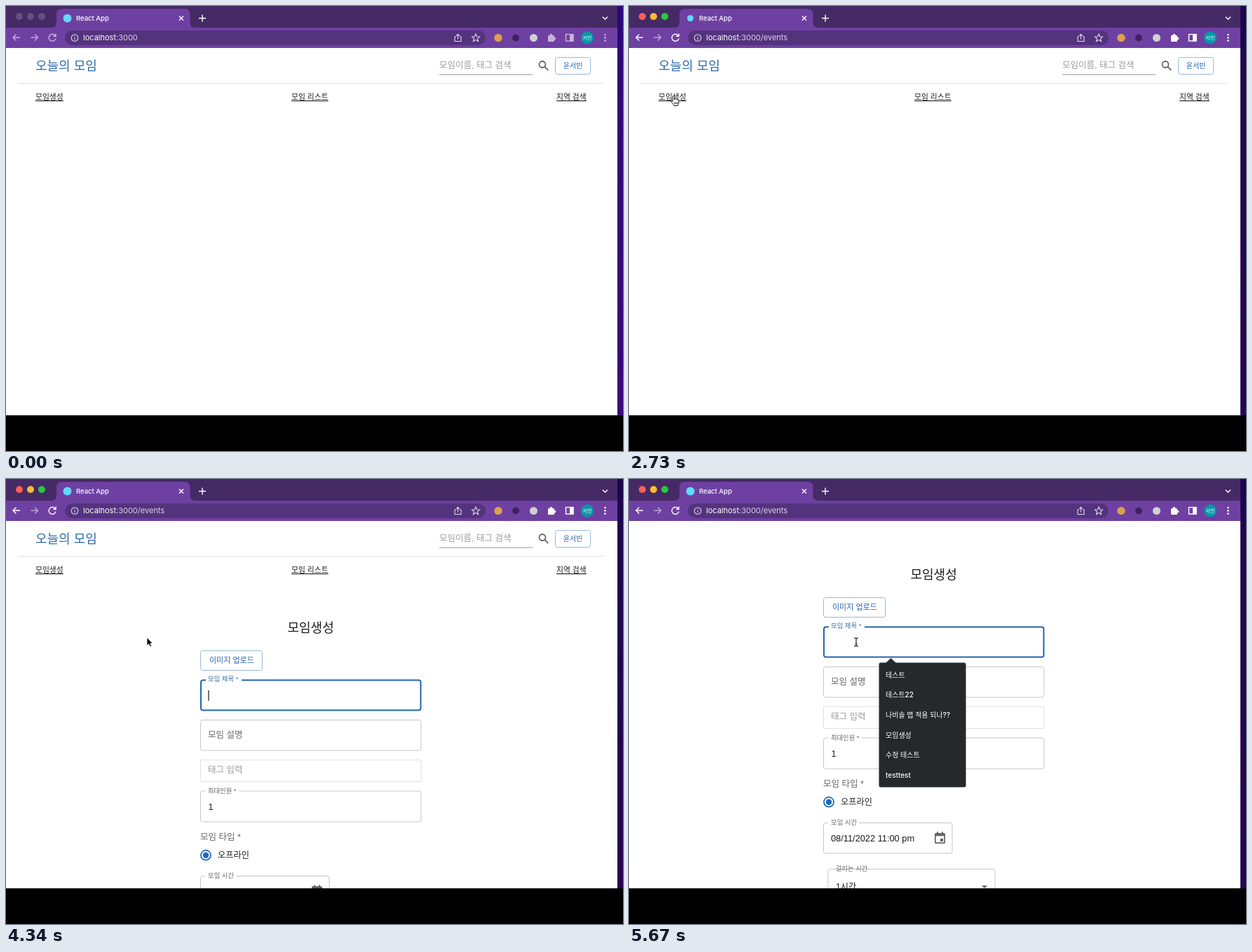
Animation of 880x636 px, one loop 5950 ms. Source, as an HTML page:

```html
<!DOCTYPE html>
<html lang="ko">
<head>
<meta charset="utf-8">
<title>오늘의 모임</title>
<style>
  html, body { margin: 0; width: 100%; height: 100%; overflow: hidden; background: #000; }
  svg { display: block; }
  text { font-family: "Liberation Sans", "Noto Sans CJK KR", sans-serif; font-size: 12.5px; fill: #1a1a1a; white-space: pre; }
  .ui text { font-family: Inter, "Noto Sans CJK KR", sans-serif; fill: #fff; }
  .title { font-size: 18px; }
  .nav { font-size: 10.8px; text-decoration: underline; }
  .button { font-weight: 500; fill: #2565ae; }
  .grey { fill: #666; }
  .hint { fill: #9c9c9c; }
  .small { font-size: 9.3px; }
  .box { fill: none; stroke: #c6c6c6; }
  .blue { fill: none; stroke: #97b8d8; }
  .icon { fill: none; stroke: #fff; stroke-width: 1.4; }
  .pale { stroke: #e2d8ee; stroke-width: 1.1; }
  .solid { fill: #fff; stroke: none; }
  #popup text { font-size: 10px; font-weight: 500; }
</style>
</head>
<body>
<svg width="880" height="636" viewBox="0 0 880 636">
  <defs>
    <linearGradient id="desk" x2="0" y2="1">
      <stop stop-color="#2c0878"/><stop offset="1" stop-color="#3d067c"/>
    </linearGradient>
    <clipPath id="view"><rect y="60" width="872" height="525"/></clipPath>
  </defs>
  <rect width="880" height="636"/>
  <rect x="871" width="9" height="585" fill="url(#desk)"/>
  <rect id="shade" x="871" width="9" height="585" opacity=".35"/>
  <rect y="60" width="872" height="525" fill="#fff"/>

  <g clip-path="url(#view)">
    <g id="page">
      <text class="title" x="42" y="91.5" style="fill:#2c69b0">오늘의 모임</text>
      <text class="hint" x="618" y="89.3">모임이름, 태그 검색</text>
      <path d="M618 98H751" stroke="#949494"/>
      <g fill="none" stroke="#665f66" stroke-width="1.8">
        <circle cx="765" cy="83.5" r="4.5"/><path d="M768.3 86.8L773.3 91.8"/>
      </g>
      <rect class="blue" x="783.5" y="73.5" width="50" height="24" rx="3"/>
      <text class="button" x="808.5" y="88.8" font-size="10" text-anchor="middle" style="font-size:10px">윤서빈</text>
      <path d="M17 110.5H853" stroke="#e0e0e0"/>
      <text class="nav" x="42" y="134">모임생성</text>
      <text class="nav" x="407" y="134">모임 리스트</text>
      <text class="nav" x="785" y="134">지역 검색</text>

      <g id="form">
        <text class="title" x="401.5" y="219">모임생성</text>
        <rect class="blue" x="277.5" y="245.5" width="88" height="28" rx="3"/>
        <text class="button" x="290" y="263" style="font-size:11px">이미지 업로드</text>

        <rect x="278" y="287.5" width="313.5" height="43" rx="3" fill="none" stroke="#2565ae" stroke-width="2"/>
        <rect class="notch" x="285" y="285" width="51" height="5" fill="#fff"/>
        <text id="nameLabel" x="288" style="fill:#3a6ea8">모임 제목 *</text>
        <rect id="caret" x="288.4" y="302" width="1.1" height="15"/>

        <rect class="box" x="277.5" y="344.5" width="314.5" height="43.5" rx="3"/>
        <text class="grey" x="288" y="370">모임 설명</text>

        <rect class="box" x="277.5" y="401.5" width="314.5" height="31" rx="1" style="stroke:#e0e0e0"/>
        <text id="tagHint" class="hint" x="288" y="420.3">태그 입력</text>

        <rect class="box" x="277.5" y="446" width="314.5" height="44" rx="3"/>
        <rect x="284" y="444" width="48" height="4" fill="#fff"/>
        <text class="grey small" x="288" y="448.5">최대인원 *</text>
        <text x="288.5" y="472.5">1</text>

        <text class="grey" x="277" y="516">모임 타입 *</text>
        <circle cx="285" cy="537.7" r="7" fill="none" stroke="#1b6ac0" stroke-width="1.7"/>
        <circle cx="285" cy="537.7" r="4.2" fill="#1b6ac0"/>
        <text x="302" y="542" style="font-size:12.2px">오프라인</text>

        <rect class="box" x="277.5" y="567.5" width="183.5" height="43.5" rx="3"/>
        <rect class="notch" x="284" y="565" width="44" height="5" fill="#fff"/>
        <text id="timeLabel" class="grey" x="288">모임 시간</text>
        <text x="288" y="594" style="font-size:12.8px">08/11/2022 11:00 pm</text>
        <g fill="#666">
          <path fill-rule="evenodd" d="M437.5 582H439V580.3H441V582H446V580.3H448V582H449.5Q451 582 451 583.5V595.5Q451 597 449.5 597H437.5Q436 597 436 595.5V583.5Q436 582 437.5 582ZM437.7 586.3V595.3H449.3V586.3Z"/>
          <rect x="444" y="590" width="4" height="4"/>
        </g>

        <rect class="box" x="284" y="633.5" width="238" height="44" rx="3"/>
        <text class="grey small" x="295" y="635.8">걸리는 시간</text>
        <text x="295" y="662.5" style="font-size:12.2px">1시간</text>
        <path d="M503 657H511L507 661Z" fill="#666"/>
      </g>
    </g>
    <rect id="bar" x="865" width="5.5" height="326" rx="2.7" fill="#7d7d7d"/>
  </g>

  <g class="ui">
    <rect width="872" height="31" fill="#452a66"/>
    <rect y="31" width="872" height="29" fill="#6e40a2"/>
    <path d="M64 31Q72 31 72 23V12Q72 4 80 4H254.500Q262.500 4 262.500 12V23Q262.500 31 270.500 31Z" fill="#6e40a2"/>
    <g id="lights"><circle cx="19" cy="15" r="5"/><circle cx="35" cy="15" r="5"/><circle cx="51" cy="15" r="5"/></g>
    <circle id="favicon" cx="87.500" cy="17.500" fill="#61dafb"/>
    <text x="100" y="21" font-weight="500" style="font-size:9.5px">React App</text>
    <g class="icon">
      <path d="M247 14.500L253 20.500M253 14.500L247 20.500M275 17.500H285M280 12.500V22.500M851 15.500L854.500 19L858 15.500"/>
    </g>
    <rect x="84" y="35" width="600" height="21" rx="10.500" fill="#54337d"/>
    <g class="icon pale">
      <circle cx="98" cy="45.500" r="4.800"/><path d="M98 44.800V48.300M98 42.500V43.600"/>
      <path d="M642 44H640V50.500H649V44H647M644.500 47.500V40.500M642 42.800L644.500 40.300L647 42.800"/>
      <path d="M670 40L671.600 43.700L675.500 44L672.500 46.600L673.500 50.500L670 48.400L666.500 50.500L667.500 46.600L664.500 44L668.400 43.700Z"/>
    </g>
    <text x="110" y="49.300" style="font-size:11px">localhost<tspan fill="#dcd0ea">:3000</tspan><tspan id="path" fill="#dcd0ea">/events</tspan></text>
    <path class="icon" opacity=".55" d="M35.500 45H45.500M41 40.500L45.500 45L41 49.500"/>
    <circle cx="702" cy="45.500" r="5.700" fill="#dda04d"/>
    <circle cx="727" cy="45.500" r="5" fill="#402260"/>
    <circle cx="752.500" cy="45.500" r="5.500" fill="#cfd2cf"/>
    <g id="tools">
      <path class="icon" d="M20 45H10M14.500 40.500L10 45L14.500 49.500M70.300 42.500A5 5 0 1 0 71 46.500M71 39.500V43.200H67.300"/>
      <g class="solid">
        <rect x="773" y="42" width="9" height="9" rx="1"/>
        <circle cx="777.500" cy="41.700" r="2"/><circle cx="782.300" cy="46.500" r="2"/>
        <rect x="804" y="40" width="5.500" height="10.500"/>
        <circle cx="854.500" cy="41" r="1.300"/><circle cx="854.500" cy="45.300" r="1.300"/><circle cx="854.500" cy="49.600" r="1.300"/>
      </g>
      <rect class="icon" x="798.500" y="40.500" width="10.500" height="9.500"/>
    </g>
    <circle cx="829" cy="45.300" r="9" fill="#0797a8"/>
    <text x="829" y="48" text-anchor="middle" style="font-size:7px">서빈</text>
  </g>

  <g id="popup" class="ui">
    <path d="M366 263L373.500 256L381 263Z" fill="#26292c"/>
    <rect x="356.500" y="262.500" width="124" height="178" rx="2.500" fill="#26292c"/>
  </g>

  <g id="cursor">
    <path id="arrow" d="M0 0V11.800L2.700 9.300L4.500 13.500L6.500 12.600L4.700 8.500H8.300Z" stroke="#fff" stroke-width=".8"/>
    <path id="hand" d="M3.200 8.500V1.700a1.200 1.200 0 0 1 2.400 0V5.500c.3-.9 2-.8 2.300.3c.4-.7 1.900-.5 2.100.5c.5-.5 2-.3 2 1V10c0 2-1.300 2.500-1.300 4.500H5C5 12.700 3.500 12 1 8.600C.2 7.400 1.700 6.600 3.200 8.500ZM6 9.500V12M8 9.500V12M10 9.500V12" fill="#fff" stroke="#111"/>
    <path id="beam" d="M-3-6Q0-6 0-4V4Q0 6-3 6M3-6Q0-6 0-4M0 4Q0 6 3 6M-1.500 2H1.500" fill="none" stroke="#222" stroke-width="1.200"/>
  </g>
</svg>
<script>
const LOOP = 5950, STEP = 70;
const ACTIVE = 1820, ROUTE = 2660, MOUNT = 3080, SETTLED = 3290, POPUP = 5460;
const cursorKeys = [
  [70, 495, 505], [350, 376, 434], [490, 376, 434], [630, 190, 321], [770, 190, 321],
  [980, 159, 115], [1050, 159, 115], [1680, 54, 137], [1820, 52, 138], [2030, 52, 138],
  [2100, 58, 131], [2240, 58, 131], [2380, 59, 128], [3640, 59, 128], [3850, 95, 90],
  [4270, 206, 222], [4340, 201, 226.5], [4970, 201, 226.5], [5040, 244, 226.5], [5250, 324, 233]
];
const labelKeys = [[MOUNT, 0], [3150, 0.6], [3220, 0.6], [3290, 0.93], [3360, 1]];

const $ = id => document.getElementById(id);
const set = (id, attrs) => { for (const k in attrs) $(id).setAttribute(k, attrs[k]); };
const show = (el, on) => { el.style.display = on ? "" : "none"; };
const lerp = (a, b, p) => a + (b - a) * p;
const ramp = (t, from, to) => Math.min(1, Math.max(0, (t - from) / (to - from)));

function sample(keys, t) {
  const next = keys.findIndex(k => k[0] > t);
  if (next < 0) return keys[keys.length - 1].slice(1);
  if (next === 0) return keys[0].slice(1);
  const a = keys[next - 1], b = keys[next], p = ramp(t, a[0], b[0]);
  return a.slice(1).map((v, i) => lerp(v, b[i + 1], p));
}

["테스트", "테스트22", "나비솔 맵 적용 되나??", "모임생성", "수정 테스트", "testtest"].forEach((word, i) => {
  const item = document.createElementNS("http://www.w3.org/2000/svg", "text");
  item.textContent = word;
  item.setAttribute("x", 366);
  item.setAttribute("y", 283.7 + i * 28.65);
  $("popup").append(item);
});

function floatLabel(id, from, to, p) {
  set(id, { y: lerp(from, to, p) });
  $(id).style.fontSize = lerp(12.5, 9.4, p) + "px";
}

function draw(t) {
  const active = t >= ACTIVE;
  show($("shade"), active);
  set("tools", { opacity: active ? 1 : 0.6 });
  ["#ff5f57", "#febc2e", "#28c840"].forEach((color, i) =>
    $("lights").children[i].setAttribute("fill", active ? color : "#66507f"));
  show($("path"), t >= ROUTE);
  set("favicon", { r: t >= ROUTE && t < SETTLED ? 4.5 : 6 });

  const [p] = sample(labelKeys, t);
  show($("form"), t >= MOUNT);
  floatLabel("nameLabel", 313.6, 289.4, p);
  floatLabel("timeLabel", 593.6, 570.4, p);
  document.querySelectorAll(".notch").forEach(n => show(n, p > 0.9));
  set("tagHint", { opacity: p * p });
  show($("caret"), Math.floor((t - 3045) / 525) % 2 === 0);

  const s = ramp(t, 4480, 4760), scroll = 76 * s * s * (3 - 2 * s);
  set("page", { transform: `translate(0 ${-scroll})` });
  set("bar", { y: 60 + scroll * 0.615, opacity: scroll > 0 ? 1 - ramp(t, 5180, 5530) : 0 });
  show($("popup"), t >= POPUP);

  const [x, y] = sample(cursorKeys, t);
  const shape = active && t < 3710 ? "hand" : t >= 5180 ? "beam" : "arrow";
  set("cursor", { transform: `translate(${x} ${y})` });
  show($("cursor"), t >= 70);
  ["arrow", "hand", "beam"].forEach(id => show($(id), id === shape));
}

const start = performance.now();
function tick() {
  const t = (performance.now() - start) % LOOP;
  draw(Math.floor(t / STEP) * STEP);
  requestAnimationFrame(tick);
}
tick();
</script>
</body>
</html>
```
